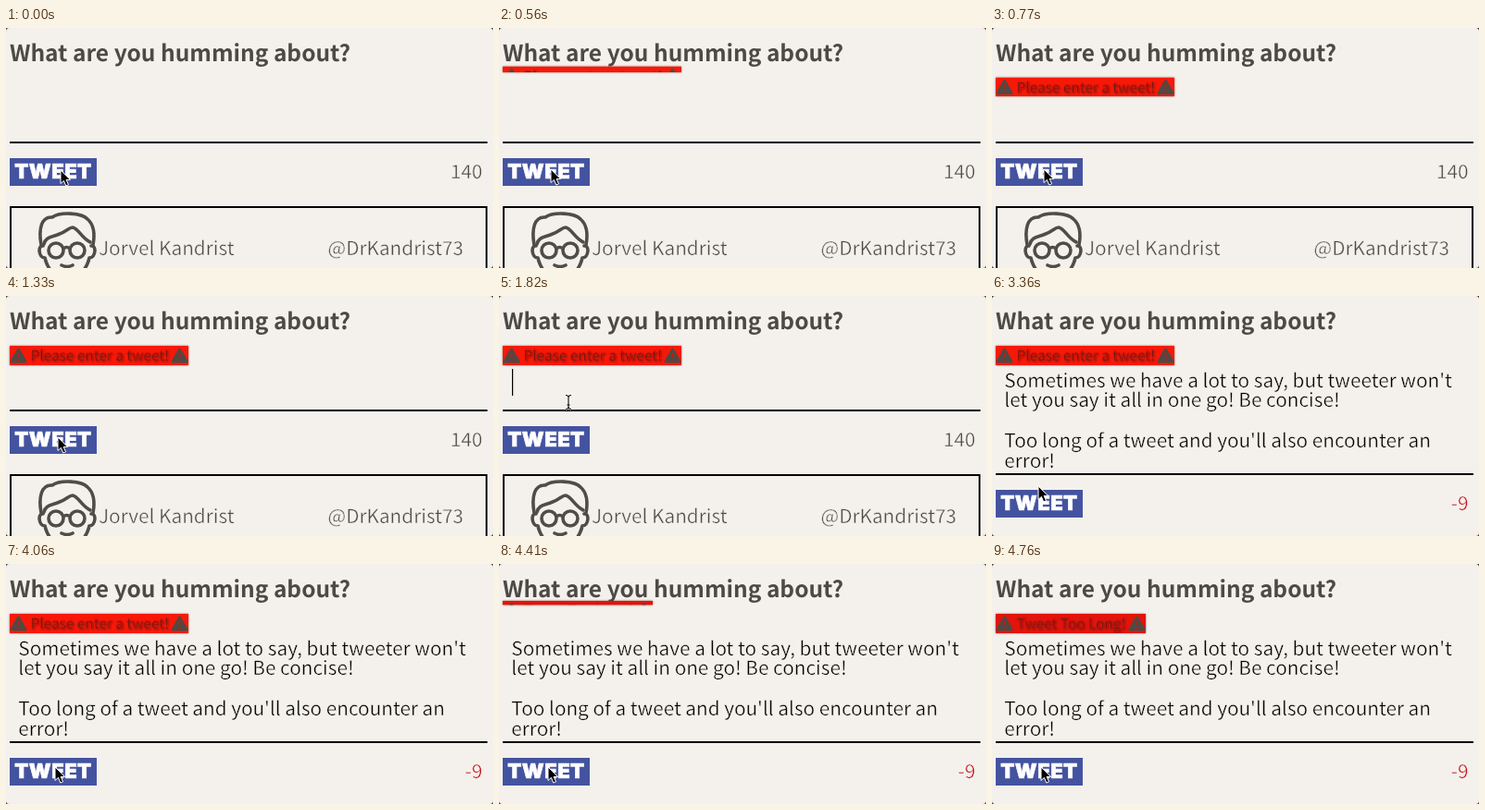
Recreate the animation shown at these times as an HTML page. Size 526 by 260 pixels, loop 5110 ms.

```html
<!DOCTYPE html>
<html lang="en">
<head>
<meta charset="utf-8">
<style>
  html, body { margin: 0; width: 100%; height: 100%; overflow: hidden; background: #333; }
  svg { display: block; }
  /* A thin outline in the background colour gives the text a light weight. */
  text { font: 300 20.76px "Noto Sans CJK JP", "Noto Sans CJK SC", "Noto Sans CJK", "Open Sans", sans-serif;
         text-rendering: geometricPrecision; fill: #4d4a46; stroke: #f4f1ec; stroke-width: .45; white-space: pre; }
  .title { font-size: 24.5px; font-weight: 700; stroke: none; }
  .draft text { fill: #000; }
  .button { font: 900 22px Inter, Lato, sans-serif; letter-spacing: .5px; fill: #fff; stroke: #fff; stroke-width: .7; }
  .end { text-anchor: end; }
  .warning { filter: drop-shadow(0 0 1px #5a0a0499); }
  .warning text { font-size: 15.4px; fill: #6c1a14; stroke: #f0180a; stroke-width: .3; filter: drop-shadow(1px 1px 1px #0006); }
  .face { fill: none; stroke: #504c49; stroke-width: 3.6; stroke-linecap: round; stroke-linejoin: round; }
</style>
</head>
<body>
<svg width="526" height="260" viewBox="0 0 526 260">
  <defs>
    <g id="alert">
      <path d="M9.5 4 L17 17 H2 Z" fill="#504944" stroke="#504944" stroke-width="3" stroke-linejoin="round"/>
      <path d="M9.5 7.5 V12 M9.5 14.5 V16" stroke="#c01d10" stroke-width="1.8"/>
    </g>
    <path id="beamShape" d="M-3 -7.5 Q0 -7.5 0 -5 Q0 -7.5 3 -7.5 M0 -5 V5 M-3 7.5 Q0 7.5 0 5 Q0 7.5 3 7.5 M-1.5 3 H1.5"/>
    <clipPath id="window"><rect width="526" height="260" rx="3.5"/></clipPath>
  </defs>

  <g clip-path="url(#window)">
    <rect width="526" height="260" fill="#f4f1ec"/>
    <text class="title" x="4" y="36">What are you humming about?</text>

    <g class="warning">
      <svg id="banner" x="4" overflow="hidden">
        <rect id="bannerFill" width="100%" height="21"/>
        <use href="#alert"/>
        <text id="bannerText" x="22.5" y="16.4"></text>
        <use id="alertEnd" href="#alert"/>
      </svg>
    </g>

    <g id="draft" class="draft">
      <text x="13.3" y="98.5">Sometimes we have a lot to say, but tweeter won't</text>
      <text x="13.3" y="120.3">let you say it all in one go! Be concise!</text>
      <text x="13.3" y="164">Too long of a tweet and you'll also encounter an</text>
      <text x="13.3" y="185.8">error!</text>
    </g>
    <rect id="caret" width="1.2" height="29"/>

    <g id="below">
      <rect x="4" y="123" width="516" height="2"/>
      <rect x="4" y="141" width="94" height="30" fill="#4453a0"/>
      <text class="button" x="51" y="163.4" text-anchor="middle">TWEET</text>
      <text id="counter" class="end" x="514.5" y="163"></text>
      <rect x="5" y="194" width="514" height="120" fill="none" stroke="#000" stroke-width="2"/>
      <g class="face">
        <path d="M38 235 C35 218 38 204 50 205 C58 199 82 200 88 207 C95 213 96 224 94 235"/>
        <path d="M41 234 C43 226 49 227 58 223 C66 220 68 216 72 216 C78 217 82 228 91 232"/>
        <path d="M40 236 C34 235 35 249 42 249 C44 258 48 264 55 269 M92 236 C98 235 97 249 90 249 C88 258 84 264 77 269"/>
        <circle cx="54" cy="241" r="8"/>
        <circle cx="77" cy="241" r="8"/>
        <path d="M62 239 Q65.5 236 69 239 M60 257 Q66 260 72 257"/>
      </g>
      <text x="100" y="246">Jorvel Kandrist</text>
      <text class="end" x="494" y="246">@DrKandrist73</text>
    </g>

    <path id="arrow" d="M0 0 V14.5 L3.4 11.4 L5.8 17 L8.5 15.8 L6.1 10.4 H10.6 Z" stroke="#fff" stroke-width="1"/>
    <g id="beam" fill="none">
      <use href="#beamShape" stroke="#fff" stroke-width="2.6"/>
      <use href="#beamShape" stroke="#000" stroke-width="1.1"/>
    </g>
  </g>
</svg>
<script>
const LOOP = 5110, STEP = 70, PASTE = 2450, RESUBMIT = 4270, SLIDE = 400;
const el = id => document.getElementById(id);
const set = (id, attrs) => { for (const k in attrs) el(id).setAttribute(k, attrs[k]); };
const show = (id, on) => set(id, { visibility: on ? "visible" : "hidden" });
const swing = p => 0.5 - Math.cos(Math.PI * Math.min(1, Math.max(0, p))) / 2;

// Pointer stops: time, x, y
const stops = [
  [0, 59, 154], [140, 56, 153], [1330, 56, 153], [1540, 80, 132], [1820, 75, 115],
  [2870, 75, 115], [3360, 50, 206], [3430, 50, 207], [3710, 53, 220], [LOOP, 53, 220]
];
const caretTimes = [[1750, 2240], [PASTE, 2940], [3500, 4060]];
const warnings = [
  { text: "Please enter a tweet!", width: 193, fill: "#f81808", start: 410 },
  { text: "Tweet Too Long!", width: 162, fill: "#e2140c", start: 4288 }
];

function pointerAt(t) {
  const i = stops.findIndex(s => s[0] > t);
  const [t0, x0, y0] = stops[i - 1], [t1, x1, y1] = stops[i];
  const p = swing((t - t0) / (t1 - t0));
  return [x0 + (x1 - x0) * p, y0 + (y1 - y0) * p];
}

function drawBanner(t) {
  const w = warnings[t < RESUBMIT ? 0 : 1];
  const p = swing((t - w.start) / SLIDE);
  show("banner", p > 0);
  set("banner", { y: 36 + 18 * p, width: w.width, height: 21 * p });
  set("bannerFill", { fill: w.fill });
  set("alertEnd", { x: w.width - 19 });
  el("bannerText").textContent = w.text;
}

function draw(t) {
  const pasted = t >= PASTE;
  drawBanner(t);
  show("draft", pasted);
  set("below", { transform: `translate(0 ${pasted ? 69 : 0})` });
  el("counter").textContent = pasted ? "-9" : "140";
  el("counter").style.fill = pasted ? "#c4131b" : "";

  show("caret", caretTimes.some(([on, off]) => t >= on && t < off));
  set("caret", pasted ? { x: 71.7, y: 163 } : { x: 14, y: 79 });

  const [x, y] = pointerAt(t);
  const overText = y < (pasted ? 193 : 124);
  show("arrow", !overText);
  show("beam", overText);
  for (const id of ["arrow", "beam"]) set(id, { transform: `translate(${x} ${y})` });
}

function frame() {
  draw(Math.floor(performance.now() % LOOP / STEP) * STEP);
  requestAnimationFrame(frame);
}
frame();
</script>
</body>
</html>
```
